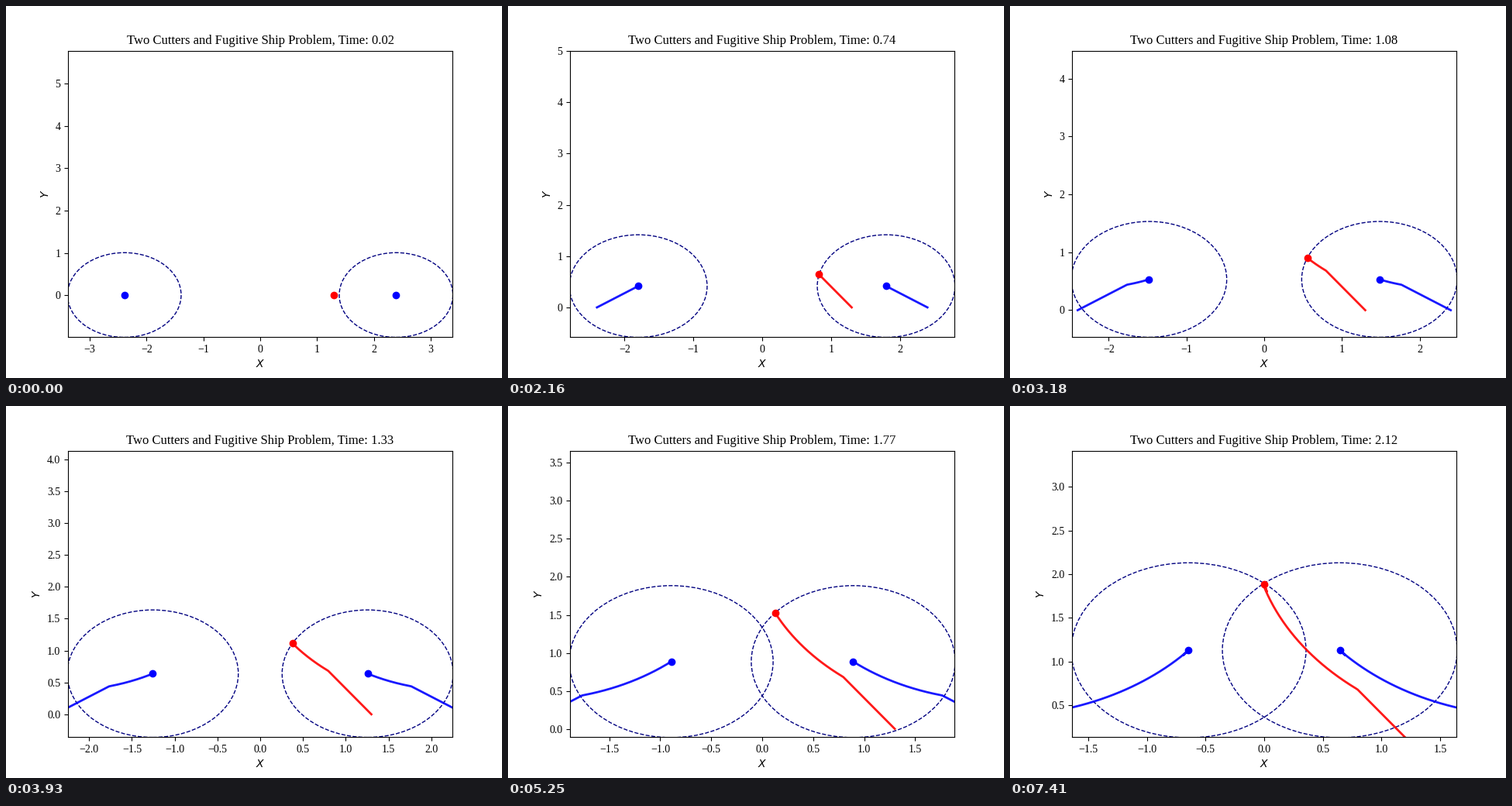
Animation of 640 by 480 pixels, one loop 7.5 s. Source, as a matplotlib script:

```python
import numpy as np
import matplotlib.pyplot as plt
from matplotlib.animation import FuncAnimation
from matplotlib.patches import Circle

plt.rcParams["font.family"] = "Liberation Serif"

DT, T_END, T_HIT = 0.01, 2.12, 0.773
FRAMES, LAST_MOVE = 250, 247
CUTTER, SHIP = np.array([2.4, 0.0]), np.array([1.3, 0.0])
SHIP_SPEED, SHIP_ANGLE = 1.1, np.radians(53.5)
CUTTER_VEL = np.array([-0.822, 0.5695])
SHIP_VEL = SHIP_SPEED * np.array([-np.cos(SHIP_ANGLE), np.sin(SHIP_ANGLE)])

# State at contact: from here the cutter chases and the ship slides round it
HIT = CUTTER + CUTTER_VEL * T_HIT
GAP = SHIP + SHIP_VEL * T_HIT - HIT
RADIUS = np.hypot(*GAP)
PHI0 = np.arctan2(GAP[1], -GAP[0])
OMEGA = np.sqrt(SHIP_SPEED**2 - 1) / RADIUS


def positions(t):
    """Right cutter and ship as (n, 2) arrays at the times t."""
    t = np.atleast_1d(t)[:, None]
    phi = PHI0 + OMEGA * (t - T_HIT)
    turn = np.hstack([np.sin(PHI0) - np.sin(phi), np.cos(PHI0) - np.cos(phi)])
    chase = HIT + turn / OMEGA
    slide = chase + RADIUS * np.hstack([-np.cos(phi), np.sin(phi)])
    slide[:, 0] = np.maximum(slide[:, 0], 0)
    early = t < T_HIT
    return (np.where(early, CUTTER + CUTTER_VEL * t, chase),
            np.where(early, SHIP + SHIP_VEL * t, slide))


def with_hook(path, back, grow):
    """Add the small back-and-forth at the end of a trail."""
    tip = path[-1]
    return np.vstack([path, tip + grow * np.array(back), tip])


fig, ax = plt.subplots(figsize=(6.4, 4.8), dpi=100)
ax.set_xlabel("$X$")
ax.set_ylabel("$Y$")
title = ax.set_title("")

COLORS = ("blue", "blue", "red")
trails = [ax.plot([], [], color=c, lw=2, alpha=0.9)[0] for c in COLORS]
dots = [ax.plot([], [], "o", color=c, ms=6, zorder=4)[0] for c in COLORS]
rings = [ax.add_patch(Circle((0, 0), 1, fill=False, ec="navy", ls="--", lw=1))
         for _ in range(2)]


def draw(i):
    t = min(DT * (i + 2), T_END)
    times = np.linspace(0, t - DT, round(t / DT))
    right, ship = positions(times)
    idle = min(i, LAST_MOVE) - (T_END / DT - 2)
    if idle > 0:
        grow = idle / 37
        right = with_hook(right, (0.045, -0.055), grow)
        ship = with_hook(ship, (0.022, -0.085), grow)
    left = right * (-1, 1)

    for path, trail, dot in zip((left, right, ship), trails, dots):
        trail.set_data(path[:, 0], path[:, 1])
        dot.set_data(path[-1:, 0], path[-1:, 1])
    for ring, path in zip(rings, (left, right)):
        ring.center = path[-1]

    x, y = positions(t)[0][0]
    ax.set_xlim(-x - 1, x + 1)
    ax.set_ylim(y - 1, y + 1 + 2 * x)
    title.set_text(f"Two Cutters and Fugitive Ship Problem, Time: {t:.2f}")
    return [*trails, *dots, *rings, title]


anim = FuncAnimation(fig, draw, frames=FRAMES, interval=30,
                     init_func=lambda: draw(0), repeat=True, repeat_delay=0)
plt.show()
```
